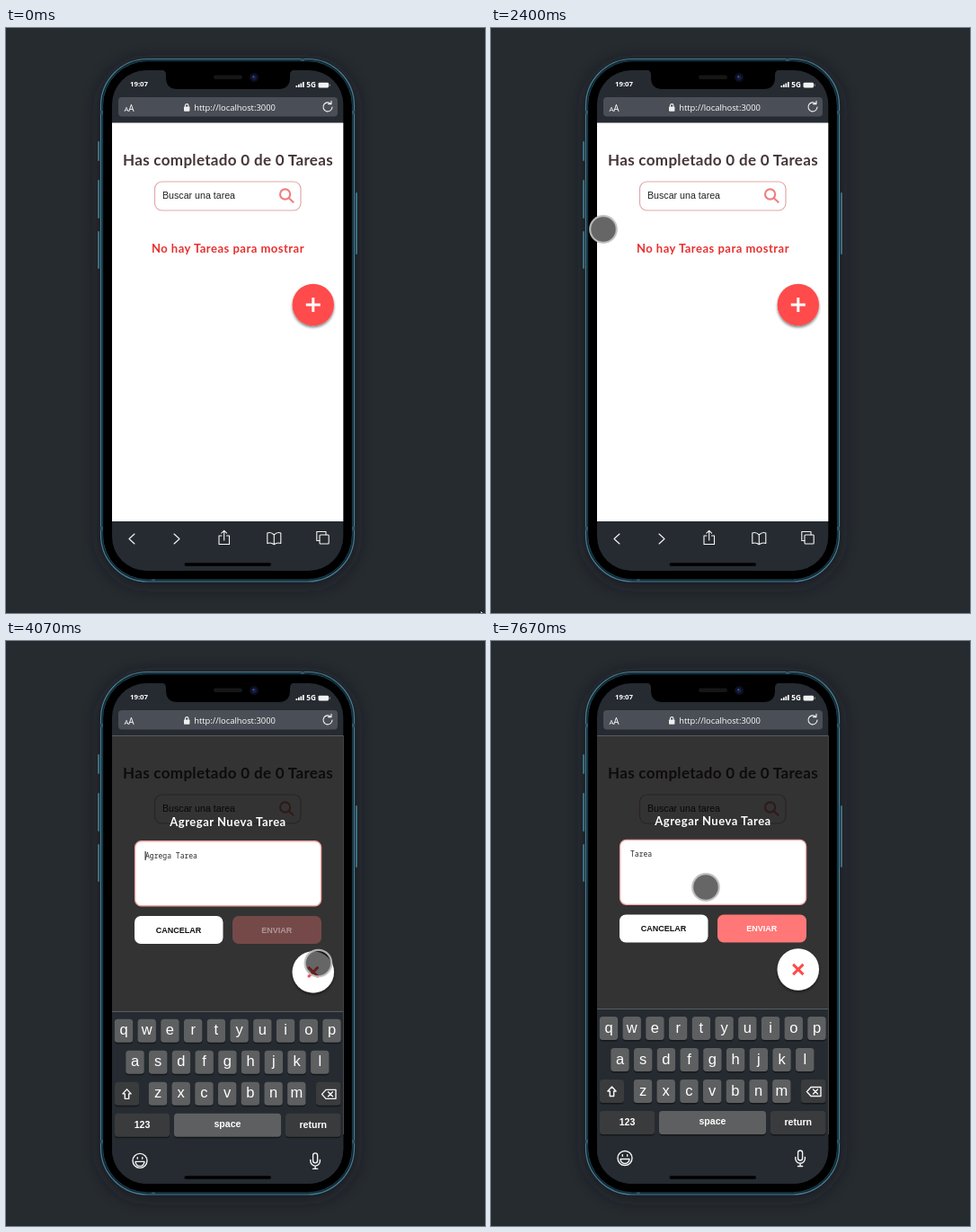
These frames come from a looping animation (533x651 px, 8000 ms). An HTML page:

```html
<!DOCTYPE html>
<html lang="es">
<head>
<meta charset="utf-8">
<title>Lista de tareas</title>
<style>
html, body { margin: 0; width: 100%; height: 100%; overflow: hidden; background: #262b30; }
svg { display: block; width: 533px; height: 651px; }
text { white-space: pre; }
.mid { text-anchor: middle; }
.head { font: 700 13px Lato, sans-serif; letter-spacing: .5px; text-anchor: middle; }
.title { font-size: 17px; letter-spacing: .32px; }
.arial { font-family: "Liberation Sans", Arial, sans-serif; }
.open { font-family: "Open Sans", sans-serif; fill: #fff; }
.mono { font: 8.05px "Noto Sans Mono", monospace; fill: #2b2b2b; }
.line { fill: none; stroke: #f4f4f4; stroke-width: 1.1; stroke-linecap: round; stroke-linejoin: round; }
.btn { font: 700 9px "Liberation Sans", Arial, sans-serif; text-anchor: middle; }
</style>
</head>
<body>
<svg viewBox="0 0 533 651">
  <defs>
    <clipPath id="screen"><rect x="118" y="47" width="257.3" height="557" rx="38"/></clipPath>
    <filter id="blur" x="-30%" y="-30%" width="160%" height="160%"><feGaussianBlur stdDeviation="9"/></filter>
    <filter id="drop" x="-30%" y="-30%" width="160%" height="170%"><feDropShadow dx="0" dy="2" stdDeviation="1.4" flood-opacity=".5"/></filter>
  </defs>
  <rect width="533" height="651" fill="#262b30"/>

  <!-- phone body -->
  <rect x="103" y="36" width="287" height="585" rx="54" fill="#14181b" opacity=".7" filter="url(#blur)"/>
  <g fill="#3c6c80">
    <rect x="102" y="126" width="2" height="22" rx="1"/>
    <rect x="102" y="169" width="2" height="43" rx="1"/>
    <rect x="102" y="226" width="2" height="42" rx="1"/>
    <rect x="389" y="183" width="2" height="69" rx="1"/>
  </g>
  <rect x="105.5" y="34.5" width="282" height="581.5" rx="52" fill="#10242d" stroke="#477f96" stroke-width="1.2"/>
  <rect x="107.6" y="36.6" width="277.8" height="577.3" rx="50" fill="#000" stroke="#1c4252"/>
  <g fill="#2f5362">
    <rect x="328" y="34" width="4" height="3"/><rect x="162" y="613.5" width="4" height="3"/>
    <rect x="105" y="92" width="3" height="4"/><rect x="385" y="92" width="3" height="4"/>
    <rect x="105" y="555" width="3" height="4"/><rect x="385" y="555" width="3" height="4"/>
  </g>

  <!-- keeps the touch spot grey where it overlaps the bezel -->
  <circle id="back" r="15" fill="#fff"/>

  <g clip-path="url(#screen)">
    <rect x="118" y="47" width="258" height="557" fill="#262b31"/>
    <!-- browser bar -->
    <rect x="125" y="77" width="244" height="21.5" rx="4" fill="#4a4e56"/>
    <text class="open" x="131.5" y="92.5" font-size="8">A</text>
    <text class="open" x="136.3" y="92.5" font-size="10">A</text>
    <rect x="198" y="87.5" width="6.4" height="5.2" rx=".8" fill="#eee"/>
    <path class="line" d="M199.4 88v-1.6a1.8 1.8 0 0 1 3.6 0V88"/>
    <text class="open mid" x="254.5" y="92" font-size="9.4">http://localhost:3000</text>
    <path class="line" d="M361.6 84.4A5 5 0 1 0 363 88M358.6 84.6h3.4v-3.4"/>

    <!-- page -->
    <rect x="118" y="105.5" width="258" height="443.5" fill="#fff"/>
    <text class="head title" x="247" y="153" fill="#453637">Has completado 0 de 0 Tareas</text>
    <rect x="165.5" y="171" width="162.5" height="32" rx="8" fill="#fff" stroke="#dfa9aa" stroke-width="1.2"/>
    <text class="arial" x="174" y="190" font-size="10.65" fill="#222">Buscar una tarea</text>
    <g fill="none" stroke="#ef7f7f" stroke-width="2.1" stroke-linecap="round">
      <circle cx="310.6" cy="185" r="5.6"/><path d="M315 189.4l4.6 4.4"/>
    </g>
    <text class="head" x="247" y="250" fill="#e8302f">No hay Tareas para mostrar</text>

    <!-- toolbar -->
    <g class="line">
      <path d="M143 563l-6 5.5 6 5.5M187 563l6 5.5-6 5.5"/>
      <path d="M240 565h-3v9.5h11.5V565h-3M242.7 570v-10.5M239.8 562.2l2.9-2.8 2.9 2.8"/>
      <path d="M298.3 564q-3.5-3.5-7.5-2v11.5q4-1.5 7.5 1.2q3.5-2.7 7.5-1.2V562q-4-1.5-7.5 2v10.5"/>
      <path d="M349 570.5h-3.2V560.5h10.2v3.5"/><rect x="349" y="564" width="10.2" height="10" rx="1"/>
    </g>

    <g id="dim">
      <rect id="shade" x="118" y="105.5" width="258" opacity=".8"/>
      <rect x="118" y="105" width="258" height="1" fill="#5a5c5f"/>
    </g>

    <g id="modal">
      <text class="head" x="247" y="205" fill="#fff">Agregar Nueva Tarea</text>
      <rect x="143.6" y="221.3" width="207" height="72" rx="7" fill="#fff" stroke="#efa5a5" stroke-width="1.3"/>
      <text id="entry" class="mono" x="155" y="240.3"></text>
      <rect id="caret" y="232.5" width="1" height="10" fill="#111"/>
      <rect x="143" y="304.5" width="98.5" height="31" rx="7" fill="#fff"/>
      <text class="btn" x="192" y="323.3" fill="#111">CANCELAR</text>
      <rect id="send" x="252" y="304.5" width="99" height="31" rx="7" fill="#f77"/>
      <text id="sendText" class="btn" x="301.3" y="323.3" fill="#fff">ENVIAR</text>
    </g>

    <g id="fab">
      <circle id="disc" r="23.2" filter="url(#drop)"/>
      <path id="plus" d="M-8 0H8M0-8V8" stroke-width="3"/>
    </g>

    <g id="keys"><rect x="118" width="258" height="196" fill="#252b30"/><rect x="118" y="-1" width="258" height="1" fill="#5a5c5f"/></g>
    <rect x="198.5" y="595.3" width="96.5" height="3.5" rx="1.7" fill="#000"/>
  </g>

  <!-- status bar and notch -->
  <path d="M172 46.5q6 0 6 5.5v3q0 13 13 13h112q13 0 13-13v-3q0-5.5 6-5.5z" fill="#000"/>
  <rect x="231" y="52.5" width="32" height="4.5" rx="2.2" fill="#161616"/>
  <circle cx="276" cy="55" r="5" fill="#0c0f1f"/><circle cx="276" cy="55" r="2.6" fill="#18204a"/>
  <circle cx="275.3" cy="54.2" r=".9" fill="#4a5c9c"/>
  <text class="open" x="138" y="65" font-size="7.8" font-weight="700">19:07</text>
  <text class="open" x="334.3" y="66.3" font-size="8.2" font-weight="700">5G</text>
  <path d="M322.5 66v-2h1.7v2zM325 66v-3.2h1.7v3.2zM327.5 66v-4.5h1.7v4.5zM330 66v-6h1.7v6z" fill="#fff"/>
  <rect x="347.5" y="60.8" width="11.5" height="5.6" rx="1.3" fill="#f2f2f2"/><rect x="359.6" y="62.5" width="1" height="2.2" fill="#aaa"/>

  <g id="touch"><circle r="14.5" fill-opacity=".6"/><circle r="14.8" fill="none" stroke="#bdbdbd" stroke-opacity=".9" stroke-width="2.2"/></g>
  <path id="arrow" d="M0 0v12.5l2.9-2.7 2 4.7 2-.9-2-4.5h4z" fill="#fff" stroke="#000" stroke-width=".8"/>
</svg>
<script>
const $ = id => document.getElementById(id);
const LOOP = 8000, TICK = 1000 / 15, OPEN = 3660;

// time, x, y of the pointer
const path = [
  [67, 528, 648], [733, 331, 235], [800, 331, 235], [1000, 298, 215], [1200, 223, 207],
  [1333, 223, 207], [1750, 150, 190], [2200, 127, 198], [2267, 120, 210], [2400, 125, 224],
  [3067, 291, 293], [3267, 343, 339], [3467, 341, 320], [3733, 341, 320], [4200, 350, 374],
  [4400, 350, 374], [4467, 274, 320], [5000, 274, 320], [5200, 239, 274]
];
const typed = [5200, 5930, 6530, 6730, 7130];
const word = "Tarea", hint = "Agrega Tarea";

const clamp = v => Math.max(0, Math.min(1, v));
const smooth = u => u * u * (3 - 2 * u);
const mix = (a, b, p) => a + (b - a) * p;
const move = (el, x, y) => el.setAttribute("transform", `translate(${x} ${y})`);
const show = (el, on) => el.setAttribute("visibility", on ? "visible" : "hidden");

function buildKeys() {
  let s = "";
  const key = (x, y, w, fill) =>
    s += `<rect x="${x}" y="${y + 1}" width="${w}" height="26.5" rx="3.5" fill="#15181b"/>` +
         `<rect x="${x}" y="${y}" width="${w}" height="26" rx="3.5" fill="${fill}"/>`;
  const label = (x, y, str, style) =>
    s += `<text class="arial mid" x="${x}" y="${y}" fill="#fff" ${style}>${str}</text>`;
  const grey = "#5e5f60", dark = "#3a3b3d", bold = 'font-size="10.6" font-weight="700"';
  [["qwertyuiop", 131], ["asdfghjkl", 143.5], ["zxcvbnm", 169]].forEach(([row, x0], r) => {
    [...row].forEach((c, i) => {
      const x = x0 + i * 25.72, y = 8 + r * 35;
      key(x - 10.2, y, 20.4, grey);
      label(x, y + 17.5, c, 'font-size="16.5"');
    });
  });
  key(121, 78, 27, dark);
  key(345, 78, 27.5, dark);
  key(121, 113, 61, dark);
  key(187, 113, 119, grey);
  key(311, 113, 61.5, dark);
  label(151.5, 129, "123", bold);
  label(246.5, 128, "space", bold);
  label(341.8, 129, "return", bold);
  s += `<g class="line" style="stroke-width:1.4">
    <path d="M134.5 86l4.6 5h-2.4v5.5h-4.4V91h-2.4z"/>
    <path d="M351.5 91.5l4.5-5h11v10h-11zM358.5 89l5 5m0-5l-5 5"/>
    <circle cx="149" cy="165.5" r="8"/>
    <path d="M144 166.5h10a5 5 0 0 1-10 0zM146.3 161.8v1.5M151.7 161.8v1.5"/>
    <rect x="341.6" y="157" width="5" height="11" rx="2.5"/>
    <path d="M338.8 164.5v1.5a5.3 5.3 0 0 0 10.6 0v-1.5M344.1 171.5v3M341.5 174.5h5.2"/></g>`;
  $("keys").insertAdjacentHTML("beforeend", s);
}

function pointer(t) {
  if (t <= path[0][0]) return path[0].slice(1);
  for (let i = 1; i < path.length; i++) {
    const [t0, x0, y0] = path[i - 1], [t1, x1, y1] = path[i];
    if (t < t1) {
      const u = (t - t0) / (t1 - t0), p = i === 1 ? smooth(u) : u;
      return [mix(x0, x1, p), mix(y0, y1, p)];
    }
  }
  return path[path.length - 1].slice(1);
}

function draw(ms) {
  const t = Math.floor((ms + 5) / TICK) * TICK;
  const open = t >= OPEN;

  // the keyboard top carries the button; the dialog follows at half the rate
  const top = 410 + 194 * Math.pow(1 - clamp((t - 3644) / 560), 3);
  for (const id of ["dim", "modal", "keys"]) show($(id), open);
  move($("keys"), 0, top);
  move($("modal"), 0, (top - 410) / 2);
  $("shade").setAttribute("height", top - 105.5);

  const p = smooth(clamp((t - 3667) / 350));
  const g = Math.round(mix(75, 255, p)), k = Math.round(mix(255, 75, p));
  move($("fab"), 341.8, open ? top - 44.5 : 308);
  $("disc").setAttribute("fill", `rgb(255,${g},${g})`);
  $("plus").setAttribute("stroke", `rgb(255,${k},${k})`);
  $("plus").setAttribute("transform", `rotate(${45 * p})`);

  const n = typed.filter(at => t >= at - 5).length;
  $("entry").textContent = n ? word.slice(0, n) : hint;
  $("caret").setAttribute("x", 154.6 + n * 4.83);
  const since = t - (n ? typed[n - 1] : OPEN);
  show($("caret"), open && Math.floor((since + 8) / 533) % 2 === 0);

  const ready = smooth(clamp((t - 5200) / 267));
  $("send").setAttribute("opacity", mix(.33, 1, ready));
  $("sendText").setAttribute("opacity", mix(.42, 1, ready));

  const [x, y] = pointer(t), touch = x < 376 && x > 118;
  for (const id of ["back", "touch", "arrow"]) {
    move($(id), x, y);
    show($(id), (id !== "arrow") === touch);
  }
}

buildKeys();
const start = performance.now();
function frame() {
  draw((performance.now() - start) % LOOP);
  requestAnimationFrame(frame);
}
frame();
</script>
</body>
</html>
```
